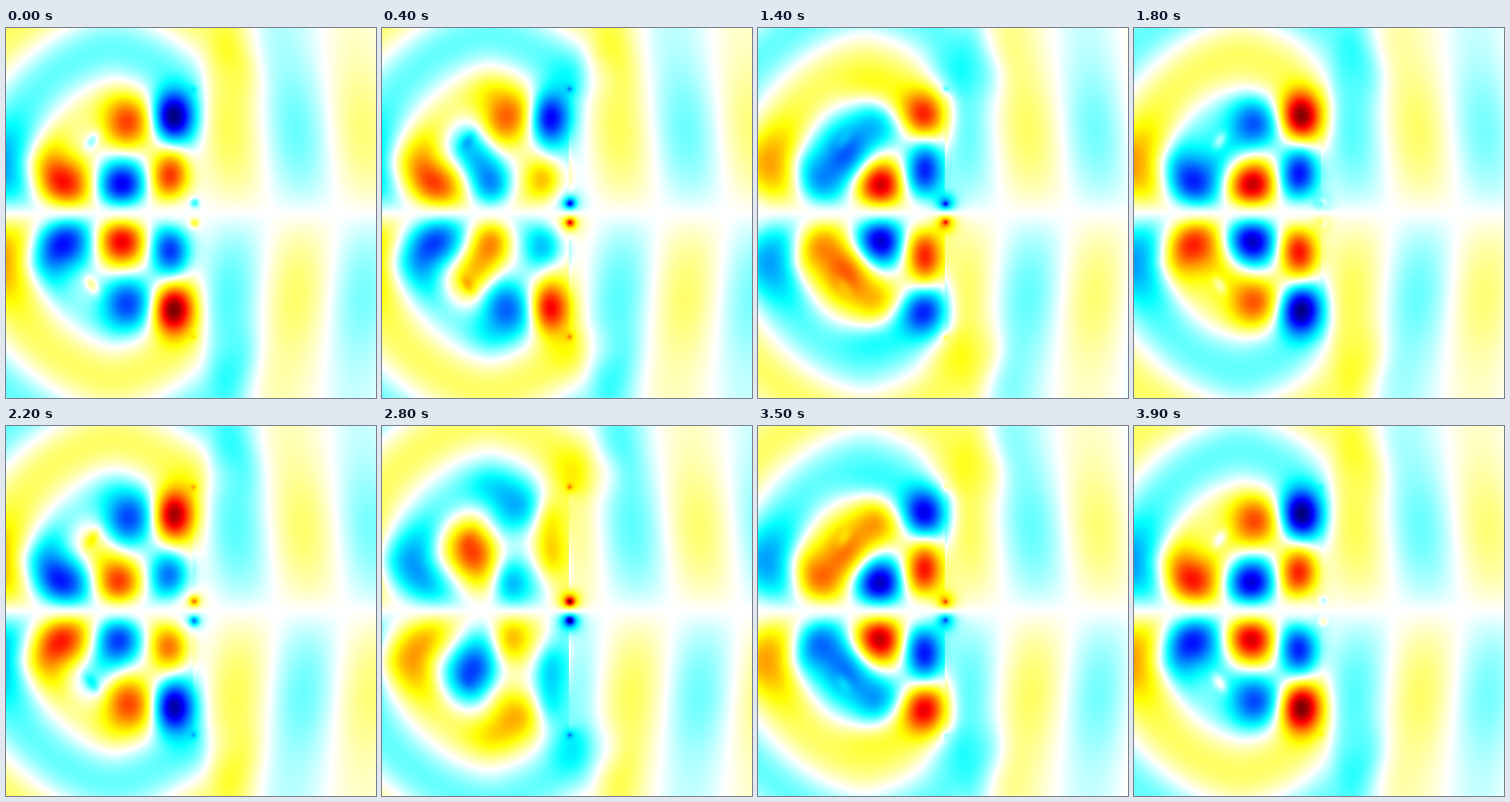
These frames come from a looping animation (400 by 400 pixels, 4000 ms). A matplotlib script:

```python
import numpy as np
import matplotlib.pyplot as plt
from matplotlib.animation import FuncAnimation
from matplotlib.colors import LinearSegmentedColormap

SIZE = 400
MID = SIZE / 2
FRAMES = 40
K = 2 * np.pi / 145          # free-space wavenumber per pixel
FACE = 202                   # x of the conductor on the flat face

# Standing lobes inside the lens, upper half: x, y, width, height, complex strength
LOBES = [
    (66, 168, 30, 30, .62),
    (125, 170, 26, 27, -.82),
    (178, 160, 22, 27, .6),
    (180, 97, 21, 27, -1),
    (130, 104, 26, 28, .58),
    (97, 136, 27, 32, -.68j),
    (137, 171, 22, 28, .62j),
    (183, 145, 18, 38, -.52j),
    (152, 88, 27, 24, .22j),
    (120, 66, 28, 22, .15j),
    (203, 52, 25, 28, -.15j),
]


def gauss(x, centre, width):
    return np.exp(-((x - centre) / width) ** 2)


def step(x, centre, width):
    return 1 / (1 + np.exp(-(x - centre) / width))


def spike(x, y, cx, cy, width):
    return np.exp(-np.hypot(x - cx, y - cy) / width)


def left_wave(x, y):
    """Rounded fronts leaving the curved side, strongest in a beam to the left."""
    r = (np.abs(x - 115) ** 1.6 + np.abs(y - 145) ** 1.6) ** 0.625
    amp = 0.15 + 0.3 * gauss(y, 148, 42) * step(-x, -60, 10)
    amp *= 1 - np.exp(-(r / 60) ** 4)
    return amp * np.tanh((MID - y) / 20) * np.exp(1j * (K * (r - 123) + np.pi))


def right_wave(x, y):
    """Nearly flat fronts leaving the flat face."""
    start = 233 + 0.08 * y + 12 * gauss(y, 52, 28) * gauss(x, 250, 25)
    amp = (0.06 + 0.1 * gauss(y, 110, 65)) * np.sqrt(280 / (x + 20))
    amp += 0.14 * gauss(x, 235, 45) * gauss(y, 15, 45)
    return amp * np.tanh((MID - y) / 25) * np.exp(1j * K * (x - start))


def build():
    """Complex amplitude of the whole stage, odd about the middle line."""
    x, y = np.meshgrid(np.arange(SIZE) + 0.5, np.arange(SIZE // 2) + 0.5)
    mix = step(x, 225 - 0.2 * y, 7)
    wave = (1 - mix) * left_wave(x, y) + mix * right_wave(x, y)

    inside = sum(s * gauss(x, cx, w) * gauss(y, cy, h) for cx, cy, w, h, s in LOBES)
    wave += inside * np.tanh((MID - y) / 15)

    # the conductor shields the quadrature field just behind it
    span = step(y, 75, 3) * step(-y, -178, 3)
    shade = 0.8 * span * (x > FACE) * np.exp(-np.abs(x - FACE) / 12)
    wave -= 1j * shade * wave.imag

    # peaks at the conductor ends and the notch on the curved face
    wave -= 0.22 * gauss(x, 204, 5) * gauss(y, 189, 5)
    wave -= 1.2j * np.tanh((MID - y) / 5) * spike(x, y, 203, 190, 5.5)
    wave -= (0.15 + 0.35j) * spike(x, y, 203, 66, 2.5)
    wave -= 0.18 * gauss(x + 0.4 * (y - 122), 93, 7) * gauss(y, 122, 10)
    return np.vstack([wave, -wave[::-1]])


cmap = LinearSegmentedColormap.from_list("wave", [
    (0, (0, 0, 0.5)), (0.125, (0, 0, 1)), (0.375, (0, 1, 1)), (0.5, (1, 1, 1)),
    (0.625, (1, 1, 0)), (0.875, (1, 0, 0)), (1, (0.5, 0, 0)),
], N=1024)

wave = build()
fig = plt.figure(figsize=(4, 4), dpi=100)
ax = fig.add_axes([0, 0, 1, 1])
ax.axis("off")
image = ax.imshow(wave.real, cmap=cmap, vmin=-1, vmax=1, interpolation="nearest",
                  aspect="auto")


def update(i):
    phase = 2 * np.pi * i / FRAMES
    image.set_data((wave * np.exp(-1j * phase)).real)
    return image,


anim = FuncAnimation(fig, update, frames=FRAMES, interval=100, repeat=True,
                     repeat_delay=0, blit=False)
plt.show()
```
